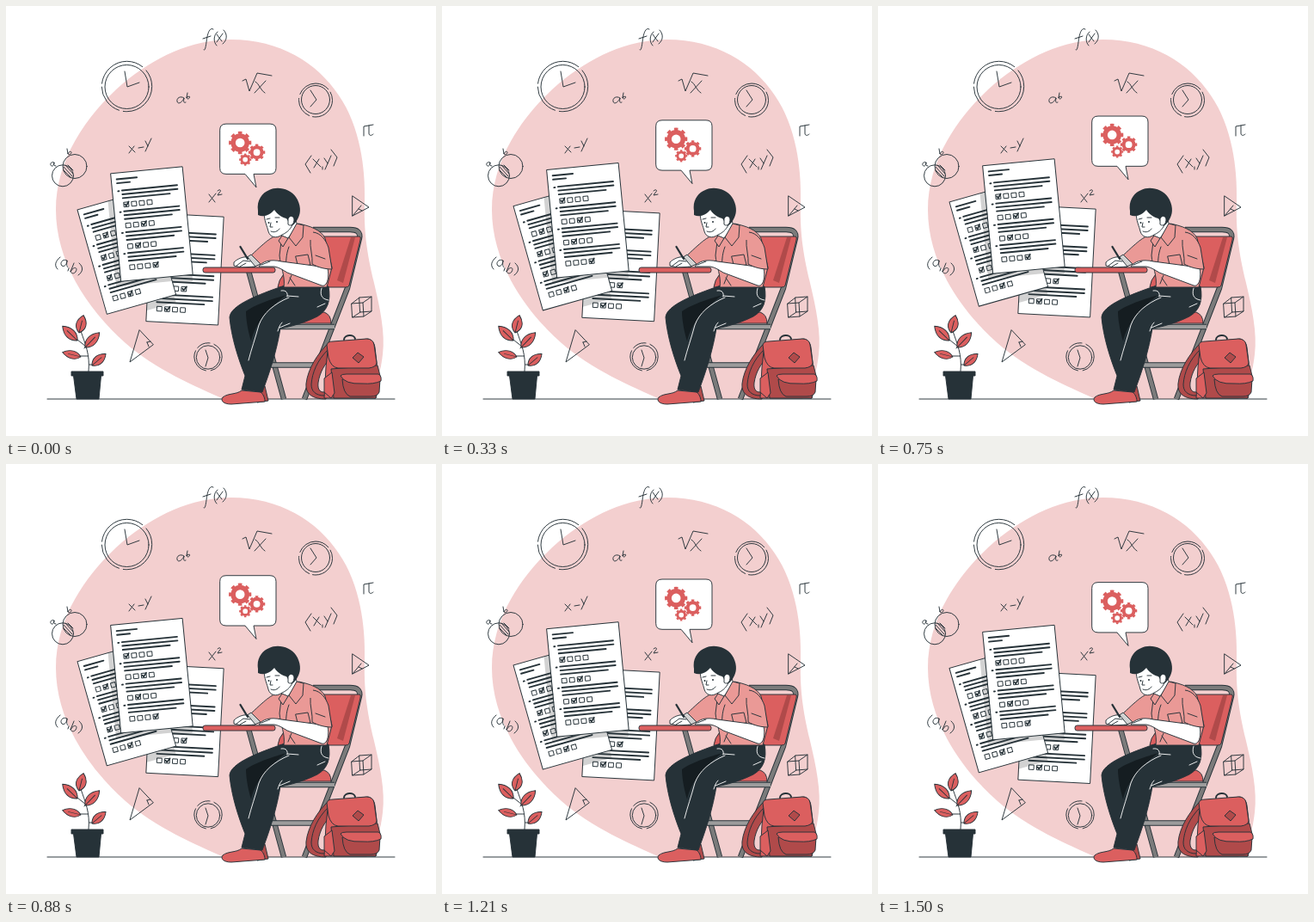
An HTML page that plays this animation: 500x500 px, repeating every 1540 ms.

```html
<!DOCTYPE html>
<html lang="en">
<head>
<meta charset="utf-8">
<title>Student taking an exam</title>
<style>
html, body { margin: 0; width: 100%; height: 100%; overflow: hidden; background: #fff }
svg { display: block; width: 100%; height: 100% }
.ink { fill: none; stroke: #263238; stroke-width: .95; stroke-linecap: round; stroke-linejoin: round }
.shape { stroke: #263238; stroke-width: .95; stroke-linejoin: round }
.dark { fill: #263238 }
.red { fill: #db5f5f }
.deep { fill: #b04a4a }
.shirt { fill: #ea9996 }
.white { fill: #fff }
.light { fill: none; stroke: #fff; stroke-width: .9; stroke-linecap: round }
.shade { fill: #d2d2d2 }
.tube { fill: none; stroke-linejoin: round }
.edge { stroke: #263238; stroke-width: 6.4 }
.core { stroke: #7b7b7b; stroke-width: 4.6 }
.pale { stroke: #9c9c9c }
</style>
</head>
<body>
<svg viewBox="0 0 500 500">
<defs>
  <path id="leaf" d="M0 0C-8 -5 -8 -13 0 -20C8 -13 8 -5 0 0ZM0 0V-14"/>
  <clipPath id="clip"><rect width="83.5" height="126"/></clipPath>
  <path id="frame" d="M357 260H400Q413 260 411 270L397 328L347 457M282 308L323 457"/>
  <path id="rails" d="M308 417.500H363M281 373H382"/>
</defs>

<path fill="#f3cfcf" d="M253 457C222 443 174 423 139 392C92 350 58 295 58 237C58 180 92 128 136 90C172 60 215 39 262 39C318 39 362 66 387 104C412 140 418 190 417 226C416 260 419 285 428 322C435 352 441 380 438 405C435 432 428 446 419 457Z"/>
<path class="ink" d="M48 457H452"/>

<!-- handwriting -->
<g class="ink">
  <path d="M241 27C236 24 234 34 233 42C232 50 231 52 230 51M229 38L238 35M246 30C241 34 241 42 245 46M245 33L251 41M252 32L245 42M253 28C258 33 257 40 252 44"/>
  <path d="M207 107C203 104 198 107 199 111C200 115 205 112 207 107C206 112 207 113 209 112M211 101L210 107C212 104 215 105 213 107C212 109 210 108 210 106"/>
  <path d="M275 87L279 85L283 99L292 78L309 81M290 88C294 90 296 98 301 101M302 87L289 101"/>
  <path d="M143 163L150 170M149 163L143 171M154 165L160 164M162 157L165 163M169 154L162 169"/>
  <path d="M236 219L243 228M244 218L236 228M246 215C249 212 251 215 248 217L246 220L251 219"/>
  <path d="M355 174L348 184L354 194M357 178L366 187M364 178L358 188M368 187L368 190M370 177L374 183M378 174L371 190M378 167L385 176L381 186"/>
  <path d="M416 151V140L427 138M422 139V148C422 151 425 151 427 149"/>
  <path d="M63 292C57 297 56 302 60 306M71 296C66 293 62 299 65 302C68 304 71 300 71 296C70 301 71 303 72 304M73 305L72 308M79 299L75 309C79 302 84 304 81 309C79 312 76 311 75 309M85 299C90 303 90 309 84 313"/>
  <path d="M56 182C53 180 50 184 53 186C55 187 56 183 56 182C55 185 56 186 58 186M71 166L72 172C74 167 78 170 75 172C74 173 73 173 72 172"/>
</g>

<!-- clocks, sets, solids -->
<g class="ink">
  <circle cx="140.500" cy="94" r="25.500"/>
  <circle cx="140.500" cy="93.500" r="29.200" stroke-dasharray="50 5 36 4 62 6"/>
  <path d="M138 76L141 94L155 89"/>
  <circle cx="360" cy="109" r="16.500"/>
  <circle cx="360" cy="109.500" r="19.500" stroke-dasharray="34 4 25 5 40 4"/>
  <path d="M354 98L361 109L354 117"/>
  <circle cx="235" cy="408.500" r="13.700"/>
  <circle cx="235" cy="408" r="16.200" stroke-dasharray="22 6 30 4 16 5"/>
  <path d="M232 400L235 409L232 419"/>
  <path d="M155 377L144 414L171 394ZM164 391L166 396M164 391L168 390"/>
  <path d="M403 221L422 234L403 244ZM403 244L413 232M410 236L414 238"/>
  <path d="M402 346L415 345L416 361L403 362ZM411 339L425 338L425 355L412 356ZM402 346L411 339M415 345L425 338M416 361L425 355M403 362L412 356"/>
  <path d="M67 187L77 198M67 191L75 199M69 185L78 195M72 185L78 191"/>
  <circle cx="80" cy="186.500" r="14"/><circle cx="66" cy="197.300" r="12.500"/>
</g>

<!-- plant -->
<path class="ink" d="M96 425C98 405 92 393 87 378M93 396L83 388M95 407H85M97 417L102 417M91 398L94 394"/>
<g class="shape red">
  <use href="#leaf" transform="translate(85 380) rotate(14) scale(.95 1.05)"/>
  <use href="#leaf" transform="translate(83 389) rotate(-46) scale(.9 1.2)"/>
  <use href="#leaf" transform="translate(92 397) rotate(44) scale(.9 1.2)"/>
  <use href="#leaf" transform="translate(87 408) rotate(-76) scale(.75 1.1)"/>
  <use href="#leaf" transform="translate(100 418) rotate(50) scale(.85 1.05)"/>
</g>
<path class="shape dark" d="M76 425H113V430H110.500L108 457H82L78.500 430H76Z"/>

<g id="float">
  <g id="papers"></g>
  <path class="shape white" d="M256 137.700H307Q314 137.700 314 144.700V189Q314 196 307 196H288L291 211.500L278 196H256Q248.700 196 248.700 189V144.700Q248.700 137.700 256 137.700Z"/>
  <g id="gears" fill="#fff" stroke="#db5f5f"></g>
</g>

<!-- chair -->
<use href="#frame" class="tube edge"/><use href="#frame" class="tube core"/>
<use href="#rails" class="tube edge"/><use href="#rails" class="tube core pale"/>
<path class="shape red" d="M366 268H411Q413 268 412 272L399 325Q398 327 395 327H316Q318 310 340 300Z"/>
<path class="deep" d="M401 269H406L392 322L385 319Z"/>
<path class="shape red" d="M285 369Q286 361 300 359L370 356Q378 359 378 369Z"/>

<!-- legs and shoes -->
<path class="shape deep" d="M296 440L301 442L305 459L292 461Z"/>
<path class="shape red" d="M274 447L296 449C300 452 301 457 301 460L262 463C253 463 249 459 252 455C258 450 268 452 274 447Z"/>
<path class="shape dark" d="M324 325L375 326C378 343 374 354 362 361C346 369 330 373 319 375C315 400 307 425 298 449L274 446L278 430C270 410 262 385 260 362C261 348 292 336 324 325Z"/>
<path fill="#151d21" d="M326 336C308 341 288 348 279 355C279 366 282 380 285 390C289 370 306 351 326 336Z"/>
<path class="light" d="M329 339C312 346 299 357 294 371C290 386 285 400 282 412M321 368C318 371 317 375 316 378M330 369L318 374M320 331C326 330 328 334 327 338M367 328C364 338 369 341 375 342M327 337L340 338M362 350L371 346"/>

<!-- far arm, torso, near arm -->
<path class="shape shirt" d="M320 265C309 268 304 272 285 290L296 301L324 296Z"/>
<path class="shape shade" d="M285 289L296 300L287 304L279 293Z"/>
<path class="shape white" d="M265 298C269 294 276 291 281 292L290 303L274 304L265 302Z"/>
<path class="ink" d="M268 302L276 296L284 297M272 303L279 299"/>
<path class="ink" style="stroke-width:2.300" d="M272.500 280L281 294"/>
<path class="shape shirt" d="M321 266L340 253C354 256 366 260 371 270L379 304L373 327H323C325 314 319 303 318 290Z"/>
<path class="shape white" d="M320 264L336 247L339 255L328 270L322 278Z"/>
<path class="shape shirt" d="M338 253L346 255L345 269L337 279L329 269ZM321 267L328 270L322 280L317 273Z"/>
<path class="ink" d="M329 280C325 290 326 299 325 305M337 291L351 289L354 301L340 303ZM332 313L328 323M356 274L359 300M330 316L336 325"/>
<path class="shape white" d="M358 302L320 297C307 294 298 297 294 303L312 303C318 304 322 307 327 310L367 325C374 327 376 314 374 305Z"/>
<path class="shape shirt" d="M357 263C366 264 372 272 375 281L379 306C371 306 363 304 356 300C357 292 353 280 354 272"/>
<path class="ink" d="M297 301L307 297M360 290L371 294"/>

<!-- head -->
<path class="shape white" d="M300 240C300 249 304 257 305 262C307 269 314 271 321 266C328 263 332 258 334 252L328 232Z"/>
<path class="dark" d="M293 238C291 226 298 217 306 214C316 209 331 213 337 222C343 231 343 240 340 246C337 252 334 256 331 255L326 247C321 246 315 242 312 237C307 243 300 246 293 243Z"/>
<path class="shape white" d="M328 250C327 244 334 242 335 248C335 253 332 257 328 254Z"/>
<path class="ink" d="M303 248L307 247M313 246L318 246M308 252L307 257L310 257M308 262C312 264 316 262 318 259"/>
<circle class="dark" cx="305.500" cy="252" r="1"/><circle class="dark" cx="315" cy="251" r="1"/>

<rect class="shape red" x="229" y="304" width="84" height="6" rx="2.500"/>

<!-- backpack -->
<path class="ink" style="stroke-width:2" d="M393 388C393 382 405 381 406 387"/>
<path class="shape deep" d="M376 391C362 404 351 422 349 439C348 451 356 457 372 457L374 448C366 451 362 447 363 438C365 425 371 416 378 409Z"/>
<path class="ink" d="M374 400C362 412 356 426 355 440C355 448 360 453 370 453"/>
<path class="shape red" d="M375 392L421 387Q428 389 429 397L434 440L430 456H370L372 420Z"/>
<path class="shape deep" d="M378 422L432 418L435 430L430 456H381Z"/>
<path class="shape red" d="M370 433L379 426L382 450L378 456L370 449Z"/>
<path class="shape red" d="M373 394Q374 390 380 390L419 387Q427 387 428 394L431 415Q430 420 422 421L386 421Q378 420 375 409Z"/>
<path class="shape deep" d="M403 409L409 403L416 408L410 415Z"/>
<path class="shape deep" d="M391 434L435 434L434 449Q432 454 424 454H400Q392 451 391 434Z"/>
<path class="shape red" d="M389 430Q390 428 396 428L433 428Q437 430 436 436Q428 440 414 439Q394 440 389 430Z"/>
</svg>

<script>
const byId = id => document.getElementById(id);
const FRONT = [122, 195.4, -5.5], LEFT = [83, 237.6, -15.8], BACK = [169.8, 241.4, 3];
const place = ([x, y, turn]) => `transform="translate(${x} ${y}) rotate(${turn})"`;

// A sheet with four questions; ticks holds the chosen box of each one.
function sheet(pose, ticks, shadows = []) {
  const [x, y, turn] = pose;
  let lines = 'M6 7.3H29.5M6 11.9H21', boxes = '', marks = '';
  ticks.forEach((tick, row) => {
    const top = 20.8 + row * 24.4;
    lines += `M6.3 ${top + .5}h1M11 ${top}H75.3M11 ${top + 4.5}H75.3M11 ${top + 9}H66`;
    for (let i = 0; i < 4; i++) boxes += `M${11.8 + i * 9.1} ${top + 14}h5.4v5.4h-5.4z`;
    marks += `M${12.6 + tick * 9.1} ${top + 16.2}l1.5 2l3.3 -4.5`;
  });
  const shade = shadows.map(([from, dx, dy]) =>
    `<g transform="rotate(${-turn}) translate(${dx - x} ${dy - y})"><rect class="shade" width="83.5" height="126" ${place(from)}/></g>`).join('');
  return `<g ${place(pose)}><rect class="white" width="83.5" height="126"/>
    <g clip-path="url(#clip)">${shade}</g>
    <path class="ink" style="stroke-width:1.9" d="${lines}"/>
    <path class="ink" d="${boxes}"/><path class="ink" style="stroke-width:1.7" d="${marks}"/>
    <rect class="ink" width="83.5" height="126"/></g>`;
}

byId('papers').innerHTML =
  sheet(BACK, [0, 2, 3, 1], [[LEFT, 0, 9], [FRONT, 0, 8]]) +
  sheet(LEFT, [1, 0, 0, 2], [[FRONT, -6, 6]]) +
  sheet(FRONT, [0, 2, 1, 3]);

const gear = (x, y, r) => `<g transform="translate(${x} ${y})">
  <circle r="${r * .62}" stroke-width="${r * .42}"/>
  <circle r="${r * .88}" fill="none" stroke-width="${r * .26}" pathLength="16" stroke-dasharray="1" stroke-dashoffset=".5"/></g>`;
byId('gears').innerHTML = gear(272.2, 159.6, 13) + gear(291.6, 170.8, 9.6) + gear(278.2, 179.2, 7);

// Steady rise and fall of ten units.
const LOOP = 1540, LEAD = 45;
function draw(now) {
  const p = (now + LEAD) % LOOP / LOOP;
  byId('float').setAttribute('transform', `translate(0 ${10 * (Math.abs(2 * p - 1) - 1)})`);
  requestAnimationFrame(draw);
}
draw(performance.now());
</script>
</body>
</html>
```
